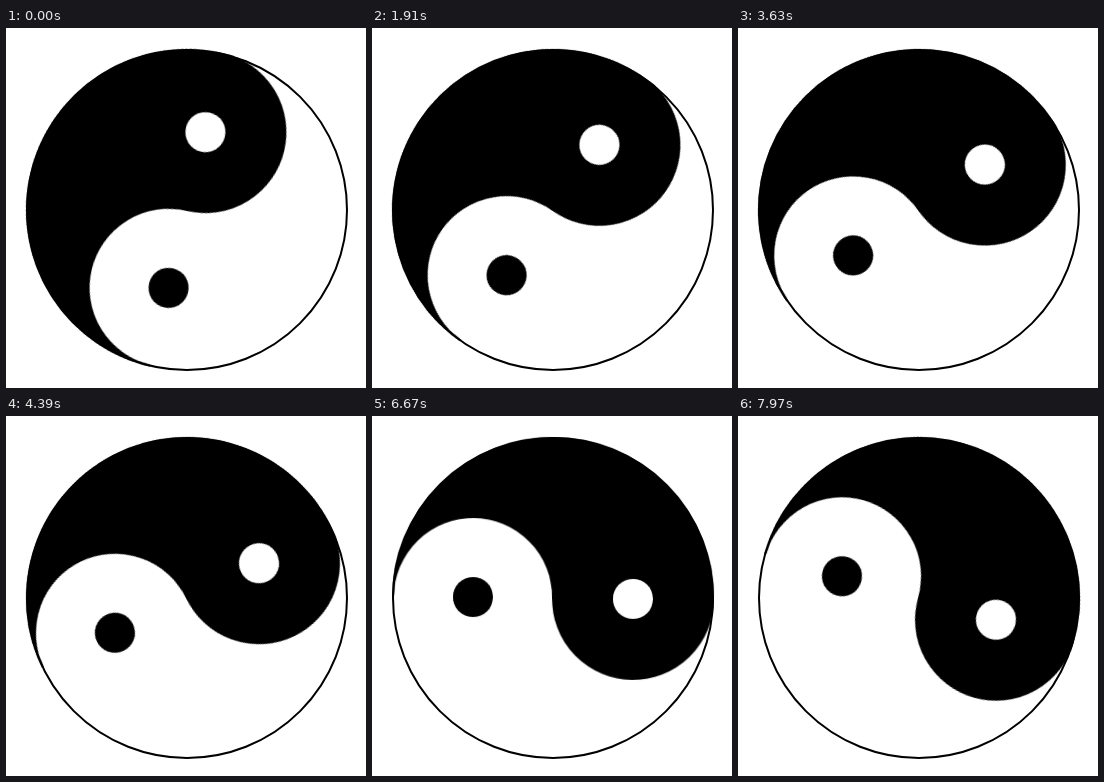
Animation of 360 by 360 pixels, one loop 8 s. Source, as an HTML page without scripts:

```html
<!DOCTYPE html>
<html lang="en">
<head>
<meta charset="utf-8">
<title>Turning yin and yang</title>
<style>
  html, body { margin: 0; width: 100%; height: 100%; overflow: hidden; background: #fff; }
  svg { display: block; width: 100vw; height: 100vh; }
  .ring { fill: #fff; stroke: #000; stroke-width: 2; }
  .yin { stroke: #000; stroke-width: 2; }
  .light { fill: #fff; }
  .turn { animation: turn 8s linear infinite; }
  @keyframes turn {
    from { transform: rotate(13.3deg); }
    to { transform: rotate(106.1deg); }
  }
</style>
</head>
<body>
<svg viewBox="0 0 360 360">
  <g transform="translate(181 182)">
    <circle class="ring" r="160"/>
    <g class="turn">
      <path class="yin" d="M0-160 A160 160 0 0 0 0 160 A80 80 0 0 1 0 0 A80 80 0 0 0 0-160Z"/>
      <circle class="light" cy="-80" r="20"/>
      <circle cy="80" r="20"/>
    </g>
  </g>
</svg>
</body>
</html>
```
